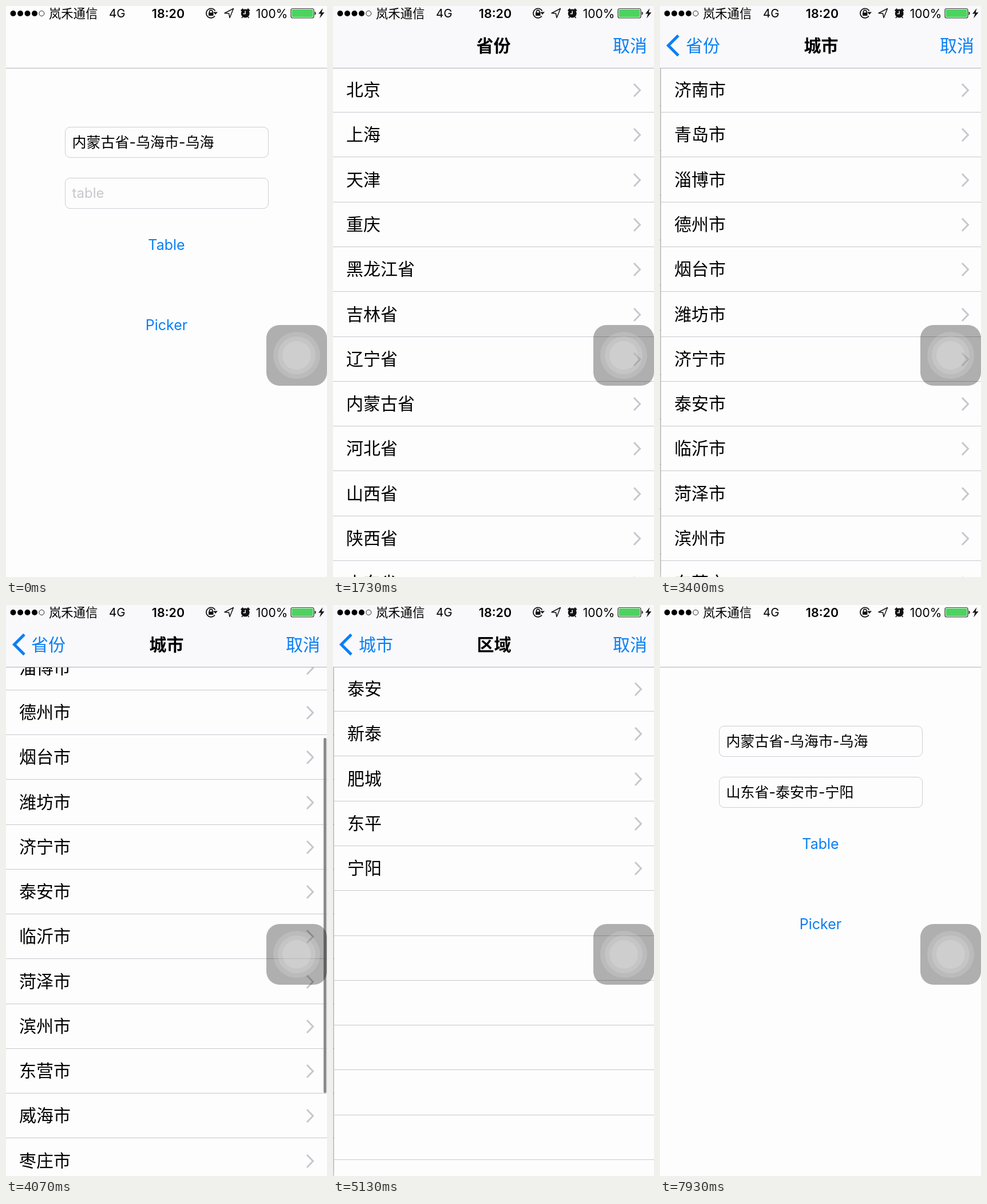
These frames come from a looping animation (561x997 px, 8 s). An HTML page:

```html
<!DOCTYPE html>
<html lang="zh-CN">
<head>
<meta charset="utf-8">
<title>Region picker</title>
<style>
  html, body { margin: 0; width: 100%; height: 100%; overflow: hidden; background: #fdfdfd; }
  body { font-family: Inter, "Noto Sans CJK SC", "Noto Sans CJK", sans-serif; color: #000; }
  #stage { position: relative; width: 561px; height: 997px; overflow: hidden; background: #fdfdfd; }
  #stage div, #stage span, #stage svg { position: absolute; box-sizing: border-box; white-space: nowrap; }
  .blue { color: #0a7ff5; }
  .rule { left: 0; top: 108px; width: 561px; height: 1px; background: #b0b0ba; }
  .field { left: 103px; width: 356px; height: 54px; padding-left: 11.5px; border: 1px solid #cdcdd6;
    border-radius: 9px; font-size: 25px; line-height: 52px; }
  .button { left: 0; width: 561px; text-align: center; font-size: 25px; line-height: 40px; }
  .hint { color: #c8c8cc; font-size: 24px; }
  #modal { left: 0; top: 0; width: 561px; height: 997px; }
  .page { left: 0; top: 0; width: 561px; height: 997px; background: #fdfdfd; }
  .clip { left: 0; top: 0; width: 561px; height: 997px; overflow: hidden; }
  .row { left: 0; width: 561px; height: 78px; padding-left: 23px; border-bottom: 1px solid #c8c8d0;
    font-size: 30px; line-height: 77px; }
  .row svg { left: 523px; top: 25px; }
  .bar { left: 555px; width: 5px; border-radius: 3px; background: #8c8c8c; }
  #nav { left: 0; top: -6px; width: 561px; height: 115px; background: #f9f9fb;
    border-bottom: 1px solid #b0b0ba; font-size: 30px; line-height: 62px; overflow: hidden; }
  #nav span, #nav svg { top: 44px; }
  #nav .title { left: 0; width: 561px; text-align: center; font-weight: 600; }
  #nav .back { left: 44px; }
  #nav .cancel { left: 489px; }
  #status { left: 0; top: 0; }
  #status text { dominant-baseline: alphabetic; }
  #touch { left: 455px; top: 557px; width: 106px; height: 106px; border-radius: 23px;
    background: rgba(0, 0, 0, .31); overflow: hidden; }
  #touch div { border-radius: 50%; background: rgba(255, 255, 255, .15); }
</style>
</head>
<body>
<div id="stage">
  <div class="rule"></div>
  <div class="field" style="top:211px">内蒙古省-乌海市-乌海</div>
  <div class="field" style="top:300px" id="result"></div>
  <div class="button blue" style="top:397px">Table</div>
  <div class="button blue" style="top:537px">Picker</div>

  <div id="modal">
    <div class="clip" id="pages"></div>
    <div id="nav">
      <span class="title">省份</span><span class="title">城市</span><span class="title">区域</span>
      <svg id="arrow" width="40" height="62"><path d="M32 13.5 14.5 31 32 48.5" fill="none" stroke="#0a7ff5" stroke-width="5"/></svg>
      <span class="back blue">省份</span><span class="back blue">城市</span>
      <span class="cancel blue">取消</span>
    </div>
  </div>

  <svg id="status" width="561" height="26">
    <g id="signal"></g>
    <text x="75" y="20.5" font-size="21.3">岚禾通信</text>
    <text x="180" y="20" font-size="20.5">4G</text>
    <text x="283.5" y="20.5" font-size="21.5" font-weight="600" text-anchor="middle">18:20</text>
    <g fill="none" stroke="#111" stroke-width="1.7">
      <path d="M365.5 8.5A8.3 8.3 0 1 0 365 17.5"/>
      <path d="M355.5 12V10a2.7 2.7 0 0 1 5.4 0v2"/>
      <path d="M382 12.5 397.500 4.500 391 20.500 389.500 13Z" stroke-linejoin="round" stroke-width="1.5"/>
      <path d="M411 8.500 414.500 5M422 5 425.500 8.500" stroke-width="3"/>
      <path d="M413.500 19 412 21M423 19 424.500 21"/>
    </g>
    <path d="M362 10.500H370L366 15ZM354 11.500H362.500V17H354Z" fill="#111"/>
    <circle cx="418.200" cy="13" r="7.500" fill="#111"/>
    <path d="M418.200 8.500V13.500H414.500" fill="none" stroke="#fff" stroke-width="1.500"/>
    <text x="492.500" y="20.500" font-size="21" text-anchor="end">100%</text>
    <rect x="498" y="4.500" width="40" height="16.500" rx="3" fill="#fdfdfd" stroke="#333" stroke-width="1.200"/>
    <rect x="499.500" y="6" width="37" height="13.500" rx="1.500" fill="#4cd35f"/>
    <path d="M539.500 9.500a3.500 3.500 0 0 1 0 6.500Z" fill="#222"/>
    <path d="M553.500 4 546 13.500H550.500L548 21.500 556.500 11.200H551.700Z" fill="#111"/>
  </svg>
  <div id="touch"></div>
</div>

<script>
const LOOP = 8000, WIDTH = 561, HEIGHT = 997, ROW = 78.27, TOP = 108.2;
const $ = id => document.getElementById(id);

const lists = [
  { names: '北京 上海 天津 重庆 黑龙江省 吉林省 辽宁省 内蒙古省 河北省 山西省 陕西省 山东省 新疆省 西藏省 青海省 甘肃省 宁夏省 河南省 江苏省',
    bar: { height: 300, rate: .33 }, scroll: { start: 1800, end: 2550, distance: 403 } },
  { names: '济南市 青岛市 淄博市 德州市 烟台市 潍坊市 济宁市 泰安市 临沂市 菏泽市 滨州市 东营市 威海市 枣庄市 日照市 莱芜市 聊城市',
    bar: { height: 620, rate: .62 }, scroll: { start: 3500, end: 4150, distance: 194 } },
  { names: '泰安 新泰 肥城 东平 宁阳' }
];
const START = { present: 1000, cities: 2907, districts: 4630, dismiss: 6475 };

function add(parent, className, html = '') {
  const el = document.createElement('div');
  el.className = className;
  el.innerHTML = html;
  return parent.appendChild(el);
}

const chevron = '<svg width="20" height="28"><path d="M3 3 13.5 14 3 25" fill="none" stroke="#c7c7ce" stroke-width="3"/></svg>';

for (const list of lists) {
  list.page = add($('pages'), 'page');
  const clip = add(list.page, 'clip');
  list.rows = add(clip, '');
  const names = list.names.split(' ');
  for (let i = 0; i < Math.max(12, names.length); i++) {
    const row = add(list.rows, 'row', names[i] ? names[i] + chevron : '');
    row.style.top = Math.round(TOP + i * ROW) + 'px';
  }
  if (list.bar) {
    list.barEl = add(clip, 'bar');
    list.barEl.style.height = list.bar.height + 'px';
  }
}

for (const r of [41, 33, 25]) {
  Object.assign(add($('touch'), '').style, {
    left: 53 - r + 'px', top: 52.5 - r + 'px', width: 2 * r + 'px', height: 2 * r + 'px'
  });
}

$('signal').innerHTML = [12.5, 25, 37.5, 50, 62.3].map((x, i) =>
  `<circle cx="${x}" cy="13" r="${i < 4 ? 5 : 4.5}" fill="${i < 4 ? '#000' : 'none'}" stroke="${i < 4 ? 'none' : '#222'}"/>`).join('');

const titles = document.querySelectorAll('.title');
const backs = document.querySelectorAll('.back');
const clamp = v => Math.min(1, Math.max(0, v));

// Critically damped spring, 0 to 1.
function spring(ms) {
  if (ms <= 0) return 0;
  const x = ms * .016;
  return 1 - (1 + x) * Math.exp(-x);
}

function place(el, x, y, opacity = 1) {
  el.style.transform = `translate(${Math.round(x)}px, ${Math.round(y)}px)`;
  el.style.opacity = clamp(opacity);
}

function drawScroll(list, t) {
  if (!list.scroll) return;
  const { start, end, distance } = list.scroll;
  const u = clamp((t - start) / (end - start));
  const offset = distance * (1 - (1 - u) ** 3);
  place(list.rows, 0, -offset);
  place(list.barEl, 0, 112 + offset * list.bar.rate, t < start ? 0 : 1 - (t - end - 100) / 200);
}

function drawPush(list, p, next) {
  place(list.page, WIDTH * (1 - p) - .32 * WIDTH * next, 0);
  list.page.style.visibility = p > 0 ? 'visible' : 'hidden';
  list.page.style.boxShadow = p < 1 ? `-3px 0 12px rgba(0,0,0,.2), 0 0 0 561px rgba(0,0,0,${.1 * p})` : 'none';
}

function draw(t) {
  const up = spring(t - START.present), down = spring(t - START.dismiss);
  const p1 = spring(t - START.cities), p2 = spring(t - START.districts);
  const filled = t >= START.dismiss;

  $('result').textContent = filled ? '山东省-泰安市-宁阳' : 'table';
  $('result').classList.toggle('hint', !filled);

  const y = HEIGHT * (1 - up + down);
  place($('modal'), 0, y);
  $('modal').style.visibility = up > 0 && y < HEIGHT + 0.5 && down < .9995 ? 'visible' : 'hidden';
  $('modal').style.display = $('modal').style.visibility === 'hidden' ? 'none' : 'block';

  lists.forEach(list => drawScroll(list, t));
  drawPush(lists[0], 1, p1);
  drawPush(lists[1], p1, p2);
  drawPush(lists[2], p2, 0);

  place(titles[0], -205 * p1, 0, 1 - 2.5 * p1);
  place(titles[1], 281 * (1 - p1) - 205 * p2, 0, Math.min(p1, 1 - 2.5 * p2));
  place(titles[2], 281 * (1 - p2), 0, p2);
  place(backs[0], 205 * (1 - p1) - 150 * p2, 0, Math.min(p1 * p1, 1 - 2.5 * p2));
  place(backs[1], 205 * (1 - p2), 0, p2 * p2);
  $('arrow').style.opacity = p1;
}

const began = performance.now();
function tick() {
  draw((performance.now() - began) % LOOP);
  requestAnimationFrame(tick);
}
tick();
</script>
</body>
</html>
```
